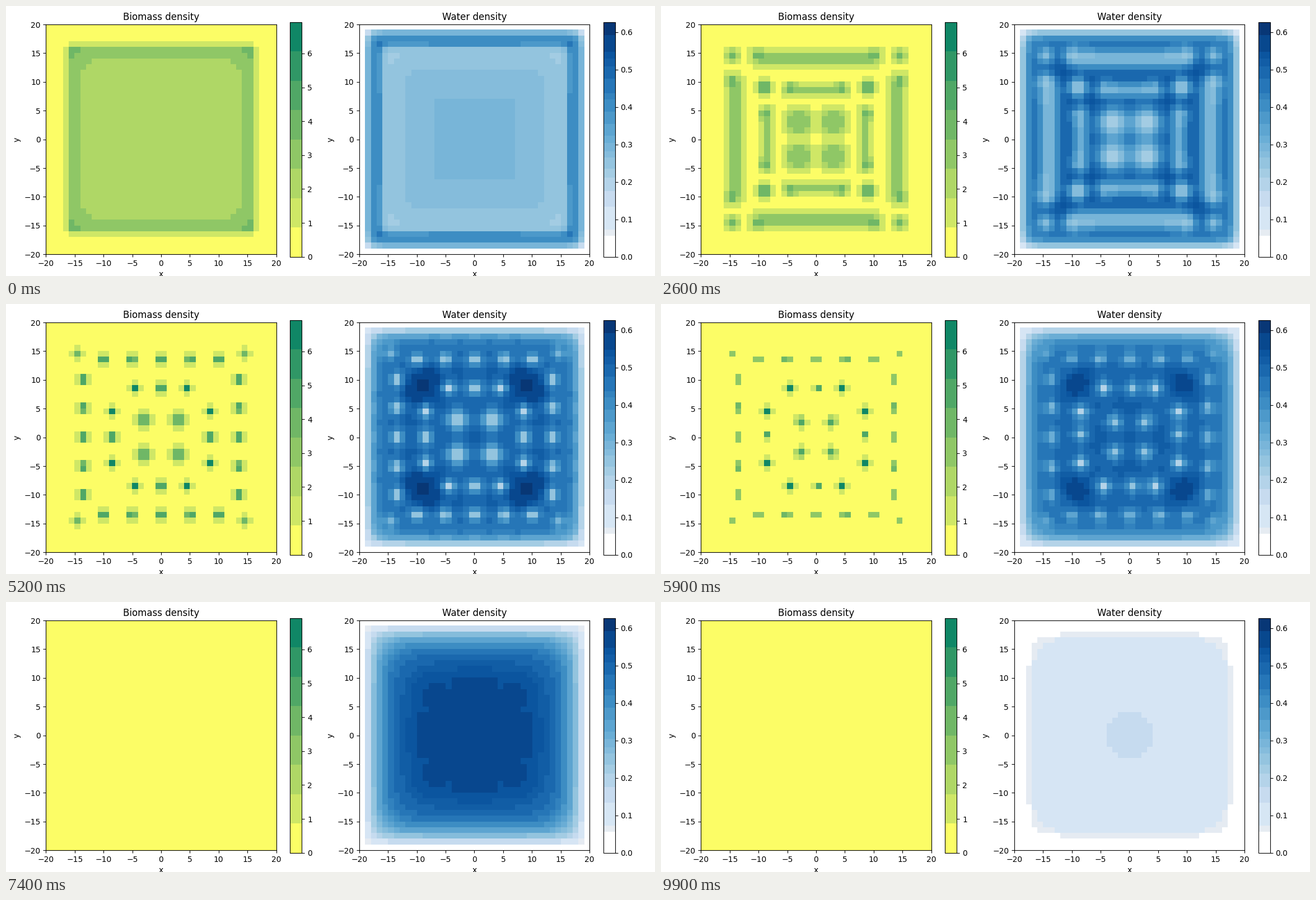
These frames come from a looping animation (1159x483 px, 10 s). A matplotlib script:

```python
import numpy as np
import matplotlib.pyplot as plt
from matplotlib.animation import FuncAnimation
from matplotlib.colors import BoundaryNorm, ListedColormap

W, H, DPI = 1159, 483, 100
FRAMES, INTERVAL = 100, 100
HALF = 20
U_MAX, W_MAX = 6.93, 0.627
MORTALITY = 0.675

plt.rcParams["font.family"] = "DejaVu Sans"

cells = np.arange(-HALF, HALF) + 0.5
sx, sy = np.meshgrid(cells, cells)
x, y = np.abs(sx), np.abs(sy)
ring = np.maximum(x, y)


def smooth(t):
    t = np.clip(t, 0, 1)
    return t * t * (3 - 2 * t)


# ---------- biomass patterns, symmetric in x, y and the diagonals ----------
def blob(cx, cy, width, height, power=1):
    def shape(a, b):
        return np.exp(-(((a - cx) ** 2 + (b - cy) ** 2) / width ** 2) ** power)
    return height * np.maximum(shape(x, y), shape(y, x))


def bar(radius, width, length, height):
    def shape(along, across):
        return np.exp(-((across - radius) / width) ** 2 - (along / length) ** 24)
    return height * np.maximum(shape(x, y), shape(y, x))


def overlay(*layers):
    return np.maximum.reduce(layers)


def rain(k):
    return 1.8985 - 0.018 * k


def meadow(k):
    """Even cover at its equilibrium, with a dense rim."""
    a = rain(k) / MORTALITY
    level = (a + np.sqrt(max(a * a - 4, 0))) / 2
    r = (x ** 40 + y ** 40) ** (1 / 40) - 0.5
    rim = 1 + 0.45 * np.exp(-np.abs(15 - r) / 1.2)
    edge = 1 / (1 + np.exp(3 * (r - 15.85)))
    return level * rim * edge + blob(15.3, 15.3, 1, 0.8)


stripes = 0.2 + overlay(
    bar(14, 1.4, 11, 3.0), blob(10, 14.5, 1.4, 4.0), blob(14.5, 14.5, 1.4, 3.7),
    bar(8.6, 1.1, 5.8, 2.9), blob(4.2, 8.75, 1.3, 3.7), blob(9, 9, 1.36, 4.8),
    blob(3, 3, 2.74, 3.0, 1.6))

spots = 0.1 + overlay(
    blob(3, 3, 1.3, 5.1), blob(14.5, 14.5, 0.8, 3.8),
    *(blob(cx, cy, 0.8, 6.5)
      for cx, cy in [(0, 8.5), (4.5, 8.5), (0, 13.5), (5.1, 13.5), (10, 13.5)]))

weak = overlay(blob(2.5, 2.5, 0.7, 5.6), blob(0.5, 8.5, 0.7, 5.6))
weak[(sx == -0.5) | (sy == -0.5)] = 0  # one cell of each pair lives on
strong = blob(4.5, 8.5, 0.77, 6.9)


def biomass(k):
    if k <= 26:  # the break-up runs from the rim inwards
        s = smooth((k - 3 - 0.5 * (16.5 - np.minimum(ring, 16.5))) / 14)
        return meadow(k) * (1 - s) + stripes * s
    if k <= 52:
        s = smooth((k - 26) / 22)
        return stripes * (1 - s) + spots * s
    if k <= 65:
        s = np.where(ring > 12, smooth((k - 56) / 9), smooth((k - 52) / 12))
        return spots * (1 - s) + overlay(weak, strong) * s
    fade = np.clip(1 - (k - 68) / 8.5, 0, 1) ** 2
    return overlay(weak * (1 - smooth((k - 65.5) / 6.5)), strong * fade)


# ---------- water: rain, evaporation, uptake and diffusion ----------
def relax(w, u, a, steps, dt=0.02, diffusion=10):
    damping = 1 + dt * (1 + u[1:-1, 1:-1] ** 2)
    for _ in range(steps):
        mid = w[1:-1, 1:-1]
        lap = w[2:, 1:-1] + w[:-2, 1:-1] + w[1:-1, 2:] + w[1:-1, :-2] - 4 * mid
        w[1:-1, 1:-1] = (mid + dt * (a + diffusion * lap)) / damping
    return w


def run():
    u = biomass(0)
    w = relax(np.zeros_like(u), u, rain(0), 1000)
    history = [(u, w.copy())]
    for k in range(1, FRAMES):
        u = biomass(k)
        w = relax(w, u, rain(k - 0.5), 50)
        history.append((u, w.copy()))
    return history


history = run()

# ---------- colours ----------
u_bounds = np.linspace(0, U_MAX, 9)
u_shades = (np.arange(8) + 0.5) / 8
u_shades[0] = 0.01
u_cmap = ListedColormap([(1 - s, 1 - s / 2, 0.4) for s in u_shades])

w_bounds = np.array([0, 0.057, 0.073, 0.134, 0.175, 0.211, 0.235, 0.265,
                     0.281, 0.304, 0.323, 0.355, 0.387, 0.42, 0.437, 0.475,
                     0.508, 0.529, 0.547, 0.592, W_MAX])
w_colors = plt.get_cmap("Blues")((w_bounds[1:] + w_bounds[:-1]) / 2 / W_MAX)
w_colors[0, :3] = 1
w_colors[1, :3] = 0.90, 0.925, 0.95
w_cmap = ListedColormap(w_colors)

# ---------- figure ----------
fig = plt.figure(figsize=(W / DPI, H / DPI), dpi=DPI, facecolor="white")


def pixel_axes(left, top, width, height):
    return fig.add_axes([left / W, 1 - (top + height) / H, width / W, height / H])


def panel(left, title, cmap, bounds, ticks, fmt):
    ax = pixel_axes(left, 33.1, 411.1, 411.1)
    image = ax.imshow(np.zeros_like(x), cmap=cmap,
                      norm=BoundaryNorm(bounds, cmap.N), origin="lower",
                      extent=(-HALF, HALF, -HALF, HALF), aspect="auto",
                      interpolation="nearest")
    ax.set(title=title, xlabel="x", ylabel="y",
           xticks=range(-20, 21, 5), yticks=range(-20, 21, 5))
    cax = pixel_axes(left + 436, 28.6, 21, 420.1)
    bar_scale = fig.colorbar(image, cax=cax, spacing="proportional",
                             ticks=ticks, format=fmt)
    bar_scale.minorticks_off()
    return image


u_image = panel(71.4, "Biomass density", u_cmap, u_bounds, np.arange(7), "%d")
w_image = panel(630.9, "Water density", w_cmap, w_bounds,
                np.arange(7) / 10, "%.1f")


def update(k):
    u, w = history[k]
    u_image.set_data(u)
    w_image.set_data(w)
    return u_image, w_image


anim = FuncAnimation(fig, update, frames=FRAMES, interval=INTERVAL,
                     repeat=True, repeat_delay=0, blit=False)
plt.show()
```
